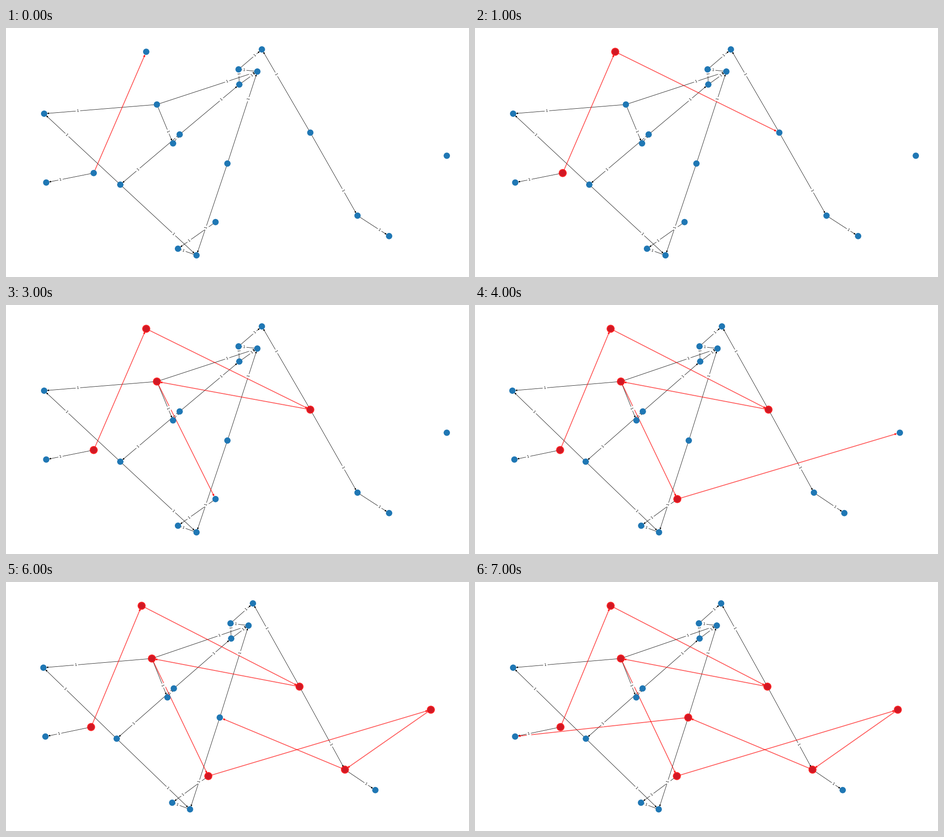
A matplotlib script that plays this animation: 1020x549 px, repeating every 8 s.

```python
import math

import matplotlib.pyplot as plt
from matplotlib.animation import FuncAnimation
from matplotlib.patches import Circle, FancyArrowPatch, FancyBboxPatch, PathPatch
from matplotlib.textpath import TextPath
from matplotlib.transforms import Affine2D

WIDTH, HEIGHT, DPI = 1020, 549, 53.125
POINT = DPI / 72
STEPS, INTERVAL = 8, 1000
NODE_SIZE, VISITED_SIZE = 300, 500
OFFSET = 0.6

NODES = {
    "a": (309.5, 53), "b": (564.3, 47.8), "c": (513, 91.8), "d": (554.3, 96.6),
    "e": (514.6, 125.2), "f": (333, 169.3), "g": (84.6, 189.5), "h": (383.2, 235.3),
    "i": (368.6, 255), "j": (488.4, 299.4), "k": (193.8, 320.4), "l": (89.2, 341.3),
    "m": (252.4, 346), "n": (462.2, 428.5), "o": (379.5, 487.2), "p": (420.3, 501.8),
    "q": (671, 231.3), "r": (775, 414.3), "s": (844.6, 459.4), "t": (971.7, 282.2),
}
EDGES = "kl fg fd fi he hm ih mg mp jd jp no po cb dc ed ec qb qr rs".split()
ROUTE = "kaqfntrjl"
DIGIT = TextPath((-3.18, -2.76), "1", size=10, prop={"family": "DejaVu Sans"})

fig = plt.figure(figsize=((WIDTH + 1e-9) / DPI, (HEIGHT + 1e-9) / DPI),
                 dpi=DPI, facecolor="white")
ax = fig.add_axes([0, 0, 1, 1])


def layout(step):
    """Node positions; the horizontal scale tightens as the route grows."""
    if step < 4:
        left, scale = 84.6, 1.0
    elif step < 7:
        left, scale = 83.0, 0.9622
    else:
        left, scale = 84.6, 0.9553
    return {name: (left + scale * (x - 84.6), y) for name, (x, y) in NODES.items()}


def draw_edge(start, end, **style):
    shrink = math.sqrt(NODE_SIZE) / 2
    ax.add_patch(FancyArrowPatch(start, end, arrowstyle="-|>", mutation_scale=10,
                                 shrinkA=shrink, shrinkB=shrink, zorder=1, **style))


def draw_weight(start, end):
    """Draw the edge weight near the arrowhead, turned along the edge."""
    (x1, y1), (x2, y2) = start, end
    angle = math.degrees(math.atan2(y2 - y1, x2 - x1))
    if angle > 90:
        angle -= 180
    elif angle < -90:
        angle += 180
    place = (Affine2D().scale(POINT, -POINT).rotate_deg(angle)
             .translate(0.3 * x1 + 0.7 * x2, 0.3 * y1 + 0.7 * y2) + ax.transData)
    ax.add_patch(FancyBboxPatch((-3.18, -4.84), 6.36, 9.68, color="white", lw=1,
                                boxstyle="round,pad=3,rounding_size=3",
                                transform=place, zorder=1))
    ax.add_patch(PathPatch(DIGIT, color="black", lw=0, transform=place, zorder=1))


def draw_nodes(points, size, **style):
    for point in points:
        ax.add_patch(Circle(point, math.sqrt(size) / 2 * POINT, lw=1.5,
                            zorder=2, **style))


def draw(step):
    ax.clear()
    ax.set(xlim=(OFFSET, WIDTH + OFFSET), ylim=(HEIGHT + OFFSET, OFFSET))
    ax.axis("off")
    pos = layout(step)

    for u, v in EDGES:
        draw_edge(pos[u], pos[v], color="black", linewidth=1.1)
    for u, v in zip(ROUTE[:step + 1], ROUTE[1:]):
        draw_edge(pos[u], pos[v], color="red", linewidth=2.5, alpha=0.65)
    for u, v in EDGES:
        draw_weight(pos[u], pos[v])

    draw_nodes(pos.values(), NODE_SIZE, color="#1f77b4")
    if step:
        visited = [pos[name] for name in ROUTE[:step + 1]]
        draw_nodes(visited, VISITED_SIZE, color="red", alpha=0.8)
    return []


anim = FuncAnimation(fig, draw, frames=STEPS, interval=INTERVAL,
                     repeat=True, repeat_delay=0)
plt.show()
```
